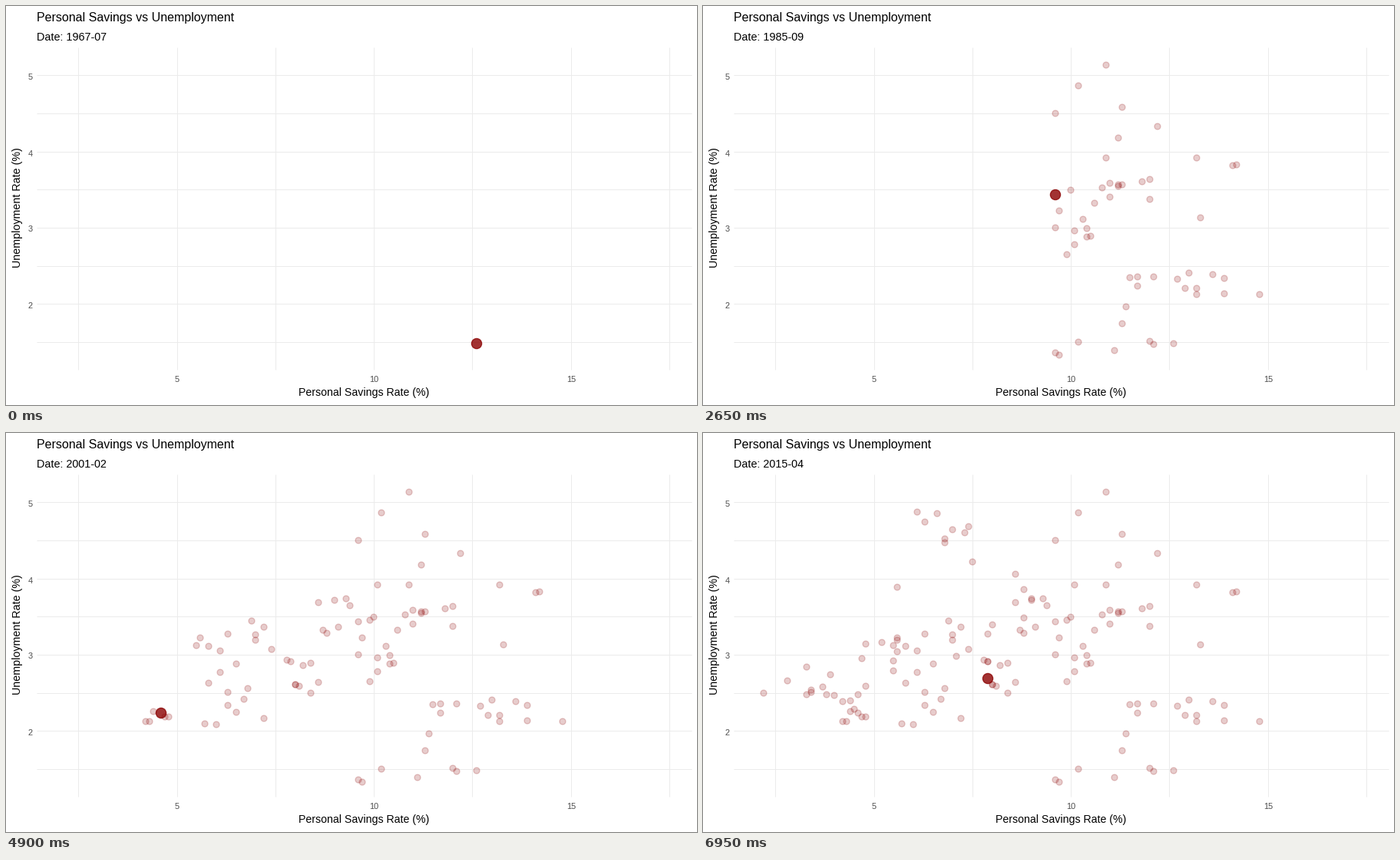
Recreate the animation shown at these times as a matplotlib script. Size 900 px wide and 520 px high, loop 7000 ms.

```python
import matplotlib.pyplot as plt
import numpy as np
from matplotlib.animation import FuncAnimation
from matplotlib.patches import Circle

W, H, DPI = 900, 520, 100
PX = 72 / DPI  # points per pixel
FRAMES, STEP = 140, 50
LEFT, RIGHT, TOP, BOTTOM = 40, 893, 54, 474
GRID, TICK, DOT = "#EBEBEB", "#4D4D4D", "#8B0000"
START = np.datetime64("1967-07-01")
DAYS = int((np.datetime64("2015-04-01") - START).astype(int))

# Turning points of the path: step, savings %, unemployment %
TURNS = [
    (0, 12.6, 1.48), (5, 9.7, 1.33), (10, 13.6, 2.38), (15, 11.7, 2.35),
    (17, 13.2, 2.12), (19, 14.8, 2.12), (21, 12.1, 2.35), (23, 14.2, 3.82),
    (28, 10.6, 3.32), (35, 9.9, 2.65), (37, 10.1, 2.96), (38, 11.2, 3.56),
    (41, 10.8, 3.52), (42, 13.2, 3.92), (45, 10.9, 5.13), (47, 9.6, 4.50),
    (50, 11.8, 3.60), (57, 7.0, 3.26), (64, 8.1, 2.59), (67, 8.6, 2.64),
    (69, 8.8, 3.28), (73, 10.1, 3.92), (77, 6.3, 3.27), (83, 6.1, 2.77),
    (90, 7.2, 2.16), (94, 4.2, 2.12), (99, 4.5, 2.28), (105, 5.6, 3.19),
    (111, 2.2, 2.50), (113, 4.2, 2.38), (119, 3.4, 2.51), (122, 6.8, 4.52),
    (124, 6.1, 4.87), (129, 6.8, 4.47), (132, 8.8, 3.86), (139, 7.9, 2.69),
]


def wander(seed=4):
    """Straight runs between the turns, with monthly scatter on the way."""
    turn, savings, jobless = np.array(TURNS).T
    step = np.arange(FRAMES)
    loose = ~np.isin(step, turn)
    rng = np.random.default_rng(seed)
    x = np.interp(step, turn, savings) + loose * rng.normal(0, 0.4, FRAMES)
    y = np.interp(step, turn, jobless) + loose * rng.normal(0, 0.05, FRAMES)
    return x.round(1), y


def to_x(rate):
    return np.rint(51.3 * rate - 33.8)


def to_y(rate):
    return np.floor(587.3 - 99.3 * rate)


def label(x, y, text, size, **kw):
    return ax.text(x, y, text, fontsize=size * PX, va="baseline", **kw)


def dot(xy, radius, alpha, z):
    return ax.add_patch(Circle(xy, radius, fc=DOT, ec=DOT, lw=1.3 * PX,
                               alpha=alpha, zorder=z))


plt.rcParams["font.family"] = "Liberation Sans"
fig = plt.figure(figsize=(W / DPI, H / DPI), dpi=DPI, facecolor="white")
ax = fig.add_axes([0, 0, 1, 1])
ax.set_xlim(0, W)
ax.set_ylim(H, 0)
ax.axis("off")

ax.vlines(to_x(np.arange(2.5, 18, 2.5)), TOP, BOTTOM, color=GRID, lw=PX, zorder=0)
ax.hlines(to_y(np.arange(1.5, 5.1, 0.5)), LEFT, RIGHT, color=GRID, lw=PX, zorder=0)
for v in (5, 10, 15):
    label(to_x(v), 490, str(v), 11, color=TICK, ha="center")
for v in (2, 3, 4, 5):
    label(34.5, to_y(v) + 5.5, str(v), 11, color=TICK, ha="right")

label(40, 20, "Personal Savings vs Unemployment", 16.06)
date = label(40, 45, "", 14.4)
label(466, 508, "Personal Savings Rate (%)", 14.17, ha="center")
label(19, 263, "Unemployment Rate (%)", 14.25, ha="center",
      rotation=90, rotation_mode="anchor")

savings, jobless = wander()
points = list(zip(to_x(savings), to_y(jobless)))
trail = [dot(p, 4, 0.2, 2) for p in points]
head = dot(points[0], 6.6, 0.8, 3)


def draw(i):
    day = START + np.timedelta64(i * DAYS // (FRAMES - 1), "D")
    date.set_text(f"Date: {day.astype('datetime64[M]')}")
    head.center = points[i]
    for k, mark in enumerate(trail):
        mark.set_visible(k < i)
    return [date, head, *trail]


anim = FuncAnimation(fig, draw, frames=FRAMES, interval=STEP,
                     repeat=True, repeat_delay=0)
plt.show()
```
